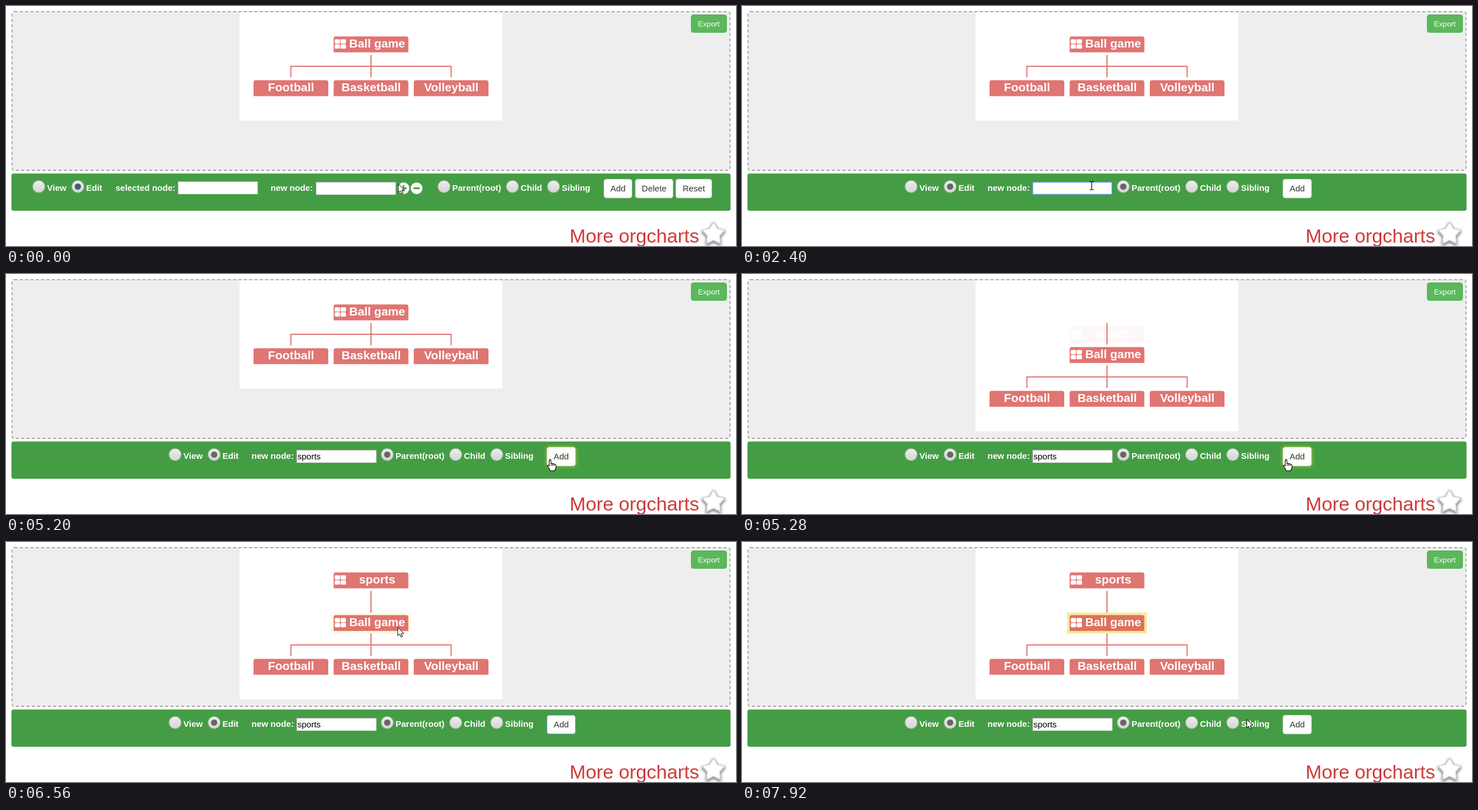
These frames come from a looping animation (1280x422 px, 8 s). An HTML page with a canvas:

```html
<!DOCTYPE html>
<html lang="en">
<head>
<meta charset="utf-8">
<title>Org chart editor</title>
<style>
html, body { margin: 0; width: 100%; height: 100%; overflow: hidden; background: #fff; }
canvas { display: block; }
</style>
</head>
<body>
<canvas id="stage" width="1280" height="422"></canvas>
<script>
const c = document.getElementById('stage').getContext('2d');
const LOOP = 8000, STEP = 80;
const GREEN = '#449d44', RED = 'rgba(217,83,79,.8)', YELLOW = '238,217,54', BLUE = '#5b9bd5';
const FONT = '"Liberation Sans", Arial, sans-serif';

// Pointer path: time, x, y
const PATH = [
  [80, 688, 313], [320, 696, 293.5], [400, 696, 293.5], [720, 825, 320],
  [1280, 825, 320], [1760, 613, 316], [4160, 613, 316], [4400, 831, 312],
  [4640, 955.5, 327.5], [5680, 955.5, 327.5], [6480, 688, 152], [6560, 687, 150],
  [6800, 685, 146], [7040, 685, 146], [7920, 885, 312]
];
const KEYS = [2720, 2800, 2960, 3120, 3360, 3520];
const clamp = v => Math.max(0, Math.min(1, v));
const between = (t, a, b) => t >= a && t < b;

function pointerAt(t) {
  const i = PATH.findIndex(p => p[0] > t);
  if (i < 0) return PATH[PATH.length - 1].slice(1);
  if (i === 0) return PATH[0].slice(1);
  const [t0, x0, y0] = PATH[i - 1], [t1, x1, y1] = PATH[i];
  const u = (t - t0) / (t1 - t0);
  return [x0 + (x1 - x0) * u, y0 + (y1 - y0) * u];
}

function text(s, x, y, size, color, bold, align = 'left') {
  c.font = `${bold ? 'bold ' : ''}${size}px ${FONT}`;
  c.textAlign = align;
  c.fillStyle = color;
  c.fillText(s, x, y);
}

function rect(x, y, w, h, fill) {
  c.fillStyle = fill;
  c.fillRect(x, y, w, h);
}

function box(x, y, w, h, r, fill, stroke) {
  c.beginPath();
  c.roundRect(x, y, w, h, r);
  if (fill) { c.fillStyle = fill; c.fill(); }
  if (stroke) { c.strokeStyle = stroke; c.lineWidth = 1; c.stroke(); }
}

function disc(x, y, r, fill) {
  c.beginPath();
  c.arc(x, y, r, 0, 7);
  c.fillStyle = fill;
  c.fill();
}

function poly(points, fill, stroke, width = 1) {
  c.beginPath();
  points.forEach(p => c.lineTo(...p));
  c.closePath();
  c.lineWidth = width;
  c.lineJoin = 'round';
  c.fillStyle = fill;
  c.fill();
  c.strokeStyle = stroke;
  c.stroke();
}

function node(label, cx, y, icon) {
  const x = cx - 65.5;
  box(x, y, 131, 28, [4, 4, 0, 0], RED);
  if (icon) for (const dx of [2, 12.3]) for (const dy of [5, 13.8])
    box(x + dx, y + dy, 9.3, 7.8, 1.8, '#fff');
  text(label, cx + (icon ? 10.8 : 0.3), y + 19.5, 20.8, '#fff', true, 'center');
}

function family(y) {
  node('Ball game', 640, y, true);
  rect(639, y + 32.5, 2, 39.5, RED);
  rect(498.5, y + 51.5, 140.5, 2, RED);
  rect(641, y + 51.5, 140.5, 2, RED);
  rect(498.5, y + 53.5, 2, 18.5, RED);
  rect(779.5, y + 53.5, 2, 18.5, RED);
  node('Football', 499.5, y + 77);
  node('Basketball', 640, y + 77);
  node('Volleyball', 780.5, y + 77);
}

function chart(t) {
  const grown = t >= 5280;
  rect(409.5, 11, 461, grown ? 265.5 : 190.5, '#fff');
  if (!grown) return family(53.5);
  const p = clamp(0.06 + (t - 5280) / 280);
  const y = 53.5 + 42 * (1 - p);
  node('sports', 640, y, true);
  rect(574, y - 1, 132, 30, `rgba(255,255,255,${1 - p})`);
  rect(639, 86, 2, 38, RED);
  rect(570, 124, 140, 37, `rgba(${YELLOW},${clamp((t - 6480) / 300) * 0.5})`);
  family(128.5);
}

function radio(label, x, dot) {
  const g = c.createLinearGradient(0, 307, 0, 328);
  g.addColorStop(0, '#eee');
  g.addColorStop(1, '#d4d4d4');
  disc(x, 317.5, 11, '#b5bdb5');
  disc(x, 317.5, 10, g);
  if (dot) disc(x, 317.5, 5.5, dot);
  text(label, x + 14.5, 324.5, 15, '#fff', true);
}

function button(label, x, w, border = '#ccc', glow) {
  c.save();
  if (glow) { c.shadowColor = `rgba(${YELLOW},.55)`; c.shadowBlur = 6; }
  box(x + .5, 304.5, w - 1, 33, 4, '#fff', border);
  c.restore();
  text(label, x + w / 2, 325.5, 15, '#333', false, 'center');
}

function input(x, y, focus) {
  rect(x, y, 140.5, 23, focus ? BLUE : '#9a9a9a');
  if (!focus) rect(x + 1, y + 1, 139.5, 22, '#e4e4e4');
  rect(x + 1.5, y + 1.5, 137.5, 20, '#fff');
}

function fullForm() {
  radio('View', 57.5);
  radio('Edit', 126, '#3f5f70');
  text('selected node:', 192, 324.5, 15, '#fff', true);
  input(301, 308);
  text('new node:', 464, 324.5, 15, '#fff', true);
  input(543, 309);
  for (const x of [697, 720]) {
    disc(x, 320.5, 10.3, '#fff');
    rect(x - 5.5, 319, 11, 3, GREEN);
    if (x === 697) rect(x - 1.5, 315, 3, 11, GREEN);
  }
  radio('Parent(root)', 768);
  radio('Child', 888);
  radio('Sibling', 960);
  button('Add', 1048, 50);
  button('Delete', 1103, 67);
  button('Reset', 1174, 64);
}

function rootForm(t, hover) {
  const focus = between(t, 1920, 5200);
  radio('View', 296.5);
  radio('Edit', 365, '#666');
  text('new node:', 430.5, 324.5, 15, '#fff', true);
  input(509, 309, focus);
  const typed = 'sports'.slice(0, KEYS.filter(k => t >= k).length);
  text(typed, 511, 325.5, 15, '#000');
  const blink = between(t, 2400, 2720) || between(t, 4000, 4640);
  if (focus && !blink)
    rect(Math.round(511 + c.measureText(typed).width), 312, 1, 16, '#000');
  radio('Parent(root)', 668.5, '#666');
  radio('Child', 788.5);
  radio('Sibling', 860.5);
  button('Add', 948, 51, between(t, 5280, 6800) && !hover ? BLUE : '#ccc', hover);
}

function star() {
  const points = (r, y) => Array.from({ length: 10 }, (_, i) => {
    const a = i * Math.PI / 5, q = i % 2 ? r * .53 : r;
    return [1240.5 + q * Math.sin(a), y - q * Math.cos(a)];
  });
  c.save();
  c.shadowColor = 'rgba(0,0,0,.55)';
  c.shadowBlur = 5;
  c.shadowOffsetY = 2;
  poly(points(21, 401), '#d2d2d2', '#d2d2d2', 2);
  c.restore();
  poly(points(17.5, 400.5), '#fff', '#fff', 2);
}

function pointer(x, y, kind) {
  c.save();
  c.translate(x, y);
  if (kind === 'text') {
    rect(-.5, -7, 1.3, 14, '#000');
    for (const dy of [-8, 6.5]) {
      rect(-3.5, dy, 3, 1.2, '#000');
      rect(.8, dy, 3, 1.2, '#000');
    }
  } else if (kind === 'hand') {
    poly([[-3, 0], [-1.5, -1.5], [0, 0], [0, 6], [2.5, 5.5], [5, 6.5], [8, 7.5], [9, 9],
      [8.5, 14], [6.5, 18.5], [-1, 18.5], [-3.5, 14], [-6.5, 10.5], [-5.5, 8.5], [-3, 10.5]],
      '#fff', '#000', 1.1);
    for (const dx of [0, 2.5, 5]) rect(dx, 6, 1, 4, '#000');
  } else {
    poly([[0, 0], [0, 15], [3.4, 11.8], [5.8, 17.3], [8.3, 16.2], [5.9, 11], [10.4, 10.6]],
      '#fff', '#000', 1);
  }
  c.restore();
}

function draw(t) {
  rect(0, 0, 1280, 422, '#fff');
  box(10.5, 10, 1259, 279, 4, '#eee');
  chart(t);
  c.setLineDash([5.6, 3.75]);
  c.strokeStyle = '#aaa';
  c.lineWidth = 1.9;
  c.beginPath();
  c.roundRect(10.5, 10, 1259, 279, 4);
  c.stroke();
  c.setLineDash([]);
  box(1201.5, 15.5, 62, 31, 4, '#5cb85c', '#4cae4c');
  text('Export', 1232.5, 35.5, 13.1, '#fff', false, 'center');
  box(9.5, 294.5, 1261, 65.5, 4, GREEN);

  const [x, y] = pointerAt(t);
  const small = t >= 1040;
  const inside = (l, r, top, bottom) => small && x > l && x < r && y > top && y < bottom;
  const onAdd = inside(948, 999, 304, 338);
  small ? rootForm(t, onAdd) : fullForm();

  text('More orgcharts', 988.3, 416, 33.75, '#d03a36');
  star();
  pointer(x, y, onAdd ? 'hand' : inside(509, 649, 309, 332) ? 'text' : 'arrow');
}

const start = performance.now();
function tick() {
  const t = (performance.now() - start) % LOOP;
  draw(Math.floor(t / STEP) * STEP);
  requestAnimationFrame(tick);
}
tick();
</script>
</body>
</html>
```
